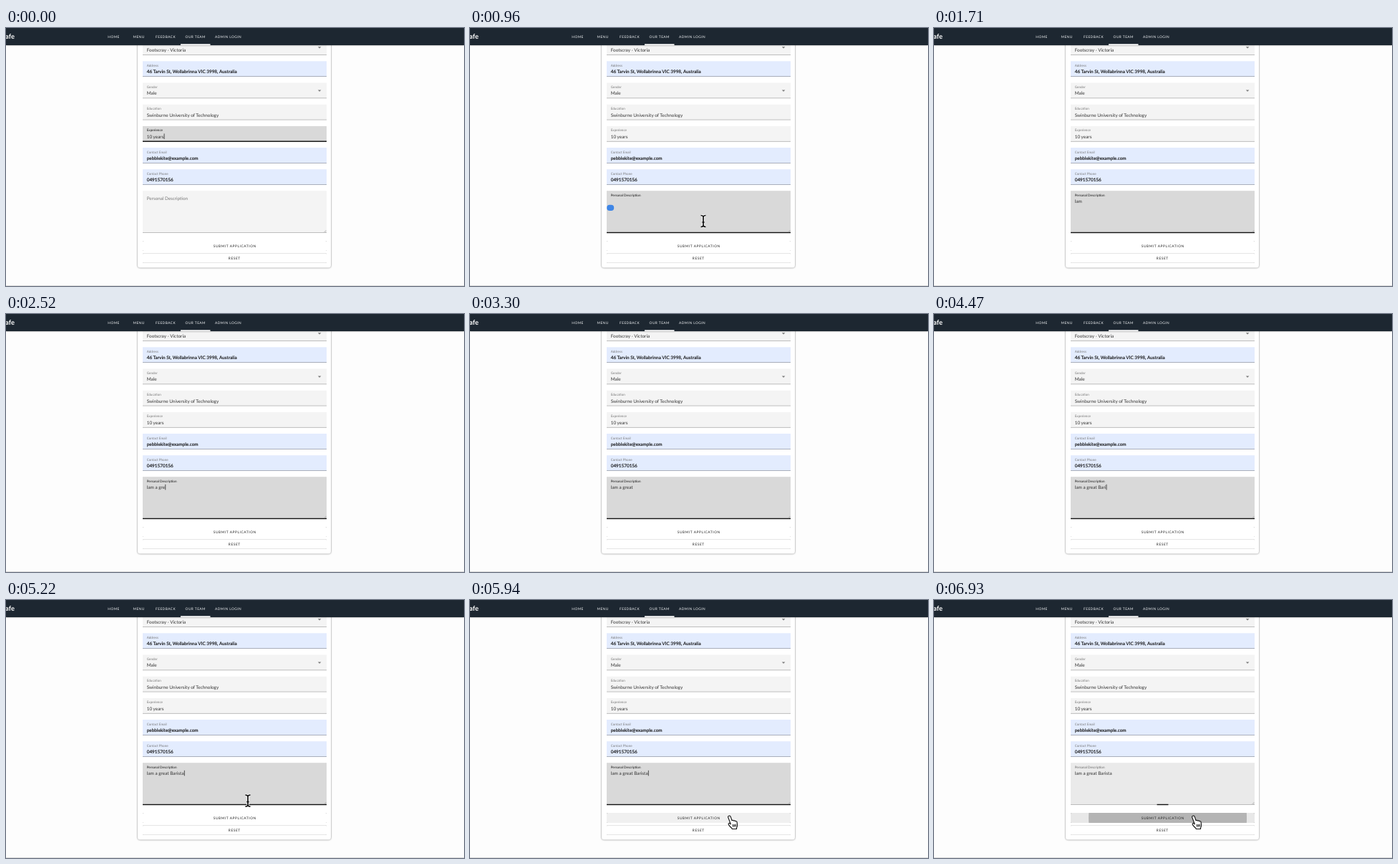
These frames come from a looping animation (640 by 360 pixels, 6.96 s). An HTML page:

```html
<!DOCTYPE html>
<html lang="en">
<head>
<meta charset="utf-8">
<title>Application form</title>
<style>
  html, body { margin: 0; width: 100%; height: 100%; overflow: hidden; background: #fdfdfd; }
  svg { display: block; width: 100vw; height: 100vh; }
  text { font-family: Lato, "Open Sans", sans-serif; text-rendering: geometricPrecision; white-space: pre; }
  .value { font-size: 6.4px; fill: #333; }
  .filled { fill: #111; font-weight: 500; stroke: #111; stroke-width: .12px; }
  .label { font-size: 4.6px; fill: #777; }
  .nav { font-size: 4.8px; letter-spacing: .45px; fill: #f2f4f6; }
  .button { font-size: 4.8px; letter-spacing: .6px; fill: #222; text-anchor: middle; }
  .card { filter: drop-shadow(0 .8px 1.2px #0008); }
  .raised { filter: drop-shadow(0 .8px .7px #0008); }
</style>
</head>
<body>
<svg id="stage" viewBox="0 0 640 360">
  <defs><clipPath id="buttonClip"><rect x="191" y="297" width="257" height="14" rx="1.5"/></clipPath></defs>
</svg>
<script>
const LOOP = 6960, FOCUS = 450, PRESS = 6805, TYPE_START = 1050;
const MESSAGE = 'Iam a great Barista';
const KEY_TIMES = [1050, 1120, 1200, 1800, 1950, 2080, 2200, 2320, 2450, 2580, 2700, 2790,
                   3780, 3990, 4170, 4380, 4560, 4710, 4860];
const LEFT = 191, WIDTH = 257, TEXT_X = 196.7;
const stage = document.getElementById('stage');

function add(tag, attrs, content) {
  const node = document.createElementNS('http://www.w3.org/2000/svg', tag);
  set(node, attrs);
  if (content) node.textContent = content;
  stage.appendChild(node);
  return node;
}
function set(node, attrs) {
  for (const key in attrs) node.setAttribute(key, attrs[key]);
}
const rect = (x, y, width, height, fill, extra) => add('rect', { x, y, width, height, fill, ...extra });
const text = (x, y, cls, content) => add('text', { x, y, class: cls }, content);
const show = (node, visible) => set(node, { visibility: visible ? 'visible' : 'hidden' });
const clamp = v => Math.max(0, Math.min(1, v));
const lerp = (a, b, p) => a + (b - a) * p;
const phase = (t, start, duration) => clamp((t - start) / duration);
const gray = v => `rgb(${[v, v, v].map(Math.round)})`;

// cubic-bezier(.4, 0, .2, 1)
function ease(x) {
  let lo = 0, hi = 1;
  for (let i = 0; i < 16; i++) {
    const s = (lo + hi) / 2, r = 1 - s;
    if (1.2 * r * r * s + .6 * r * s * s + s ** 3 < x) lo = s; else hi = s;
  }
  return 3 * (1 - lo) * lo * lo + lo ** 3;
}

function field(y, height, label, value, filled) {
  const box = rect(LEFT, y, WIDTH, height, filled ? '#e3ecfe' : '#f4f4f4');
  rect(LEFT, y + height - .6, WIDTH, .7, filled ? '#8e949f' : '#a5a5a5');
  const line = rect(LEFT, y + height - 1, WIDTH, 1.4, '#111', { visibility: 'hidden' });
  const caption = text(TEXT_X, y + 7.5, 'label', label);
  const entry = text(TEXT_X, y + 16.8, filled ? 'value filled' : 'value', value);
  return { box, line, caption, entry };
}
const arrow = y => add('path', { d: `M435.8 ${y}h4.6l-2.3 2.3z`, fill: '#777' });

rect(0, 0, 640, 360, '#fdfdfd');
rect(0, 359, 640, 1, '#dcdcdc');
rect(184, 10, 270, 324.5, '#fff', { rx: 3.5, class: 'card' });

field(16.1, 21.6, '', 'Footscray - Victoria');
arrow(26.3);
field(46.3, 21.6, 'Address', '46 Tarvin St, Wollabrinna VIC 3998, Australia', true);
field(76.5, 21.6, 'Gender', 'Male');
arrow(86.5);
field(106.7, 21.6, 'Education', 'Swinburne University of Technology');
const experience = field(136.9, 21.6, 'Experience', '10 years');
field(167, 21.6, 'Contact Email', 'pebblekite@example.com', true);
field(197.2, 21.6, 'Contact Phone', '0491570156', true);
const about = field(227.2, 58.6, 'Personal Description', '');
add('path', { d: 'M444.5 285l3-3M446.3 285l1.2-1.2', stroke: '#888', 'stroke-width': .5 });
const caret = rect(0, 0, .7, 7.6, '#111');
const badge = rect(191.2, 246.8, 10, 8.2, '#3f86e6', { rx: 4 });

const submit = rect(LEFT, 297, WIDTH, 14, '#fff', { rx: 1.5, class: 'raised' });
const ripple = add('circle', { cy: 304, fill: '#b4b4b4', 'clip-path': 'url(#buttonClip)' });
text(319.8, 306, 'button', 'SUBMIT APPLICATION');
rect(LEFT, 314.2, WIDTH, 13.6, '#fff', { rx: 1.5, class: 'raised' });
text(319.3, 322.9, 'button', 'RESET');

rect(0, 0, 640, 24, '#1d2731', { class: 'card' });
set(text(12, 15, '', 'afe'), { 'text-anchor': 'end', 'font-size': 9.4, 'font-weight': 700, fill: '#fff' });
[[142.3, 'HOME'], [177.5, 'MENU'], [209, 'FEEDBACK'], [250.6, 'OUR TEAM'], [292, 'ADMIN LOGIN']]
  .forEach(([x, name]) => text(x, 13.6, 'nav', name));
rect(244, 22.3, 41.5, 1.7, '#fff');

const beamShape = 'M-3.5-8q3 0 3.5 2q.5-2 3.5-2M0-6V6M-3.5 8q3 0 3.5-2q.5 2 3.5 2M-1.6 1.5h3.2';
const beam = ['#fff', '#111'].map((stroke, i) =>
  add('path', { d: beamShape, fill: 'none', stroke, 'stroke-width': i ? 1.7 : 3.2 }));
const hand = add('path', {
  d: 'M0 0c1.2-.6 2.2.2 2.6 1.4L4.4 6.6c.8-.8 2-.6 2.4.4c.8-.7 1.9-.4 2.3.5c.9-.5 1.9 0 2.2 1' +
     'l.6 4c.2 2-.4 3-1 4l-.1 1.8h-6.3l-.4-1.2c-1.4-1-3-2.6-4.3-4.7c-1.2-1.8.6-2.8 1.8-1.8' +
     'l1 1L-1 2C-1.4 1-.8.3 0 0zM5.6 12l.5 3.4M7.6 11.8l.4 3.4M9.6 11.5l.2 3.4',
  fill: '#fff', stroke: '#111', 'stroke-width': 1.1, 'stroke-linejoin': 'round'
});

function drawField({ box, line, caption }, focus, bg, lineScale) {
  set(box, { fill: gray(lerp(0xf4, 0xd9, bg)) });
  set(caption, { style: `fill:${gray(lerp(0x77, 0x11, focus))}` });
  show(line, lineScale > 0);
  set(line, { x: LEFT + WIDTH * (1 - lineScale) / 2, width: WIDTH * lineScale });
}

function drawCaret(t, typed) {
  const inAbout = t >= FOCUS;
  const lastKey = typed ? KEY_TIMES[typed - 1] : inAbout ? FOCUS : 0;
  const { entry } = inAbout ? about : experience;
  set(caret, {
    x: TEXT_X + (entry.textContent ? entry.getComputedTextLength() : 0) + .3,
    y: inAbout ? 237.8 : 147.4
  });
  show(caret, t < PRESS && (t - lastKey) % 1000 < 500);
}

function drawPointer(t) {
  const enter = ease(phase(t, 150, 270));
  const leave = ease(phase(t, 5100, 420));
  const x = lerp(326, 361.7, leave);
  const y = t < 5000 ? lerp(222, 269.5, enter) : lerp(269.5, 301.2, leave);
  const overButton = t > 5000 && y > 296;
  const beamVisible = !overButton && (t >= 150 && t < TYPE_START || t >= 5100);
  for (const node of [...beam, hand]) set(node, { transform: `translate(${x} ${y})` });
  beam.forEach(node => show(node, beamVisible));
  show(hand, overButton);
  return overButton;
}

function render(t) {
  const typed = KEY_TIMES.filter(k => k <= t).length;
  about.entry.textContent = MESSAGE.slice(0, typed);
  set(about.entry, { y: 243.7 });

  const leaveOld = phase(t, FOCUS, 200);
  drawField(experience, 1 - leaveOld, 1 - leaveOld, 1 - ease(phase(t, FOCUS, 180)));

  const focus = phase(t, FOCUS, 150) * (1 - phase(t, PRESS, 150));
  const bg = phase(t, FOCUS, 150) * (1 - phase(t, PRESS, 200));
  const line = ease(phase(t, FOCUS, 180)) * (1 - ease(phase(t, PRESS, 180)));
  drawField(about, focus, bg, line);
  const float = ease(phase(t, FOCUS, 150));
  set(about.caption, {
    y: lerp(240, 234.7, float),
    style: `font-size:${lerp(6.3, 4.6, float)}px;fill:${gray(lerp(0x77, 0x11, focus))}`
  });

  drawCaret(t, typed);
  show(badge, t >= FOCUS + 60 && t < TYPE_START);

  const hovered = drawPointer(t);
  const pressed = t >= PRESS;
  set(submit, { fill: pressed ? '#e8e8e8' : hovered ? '#f0f0f0' : '#fff' });
  const spread = ease(phase(t, PRESS, 225));
  show(ripple, pressed);
  set(ripple, { cx: lerp(364, 319.5, spread), r: lerp(60, 120, spread) });
}

function frame() {
  render(performance.now() % LOOP);
  requestAnimationFrame(frame);
}
frame();
</script>
</body>
</html>
```
